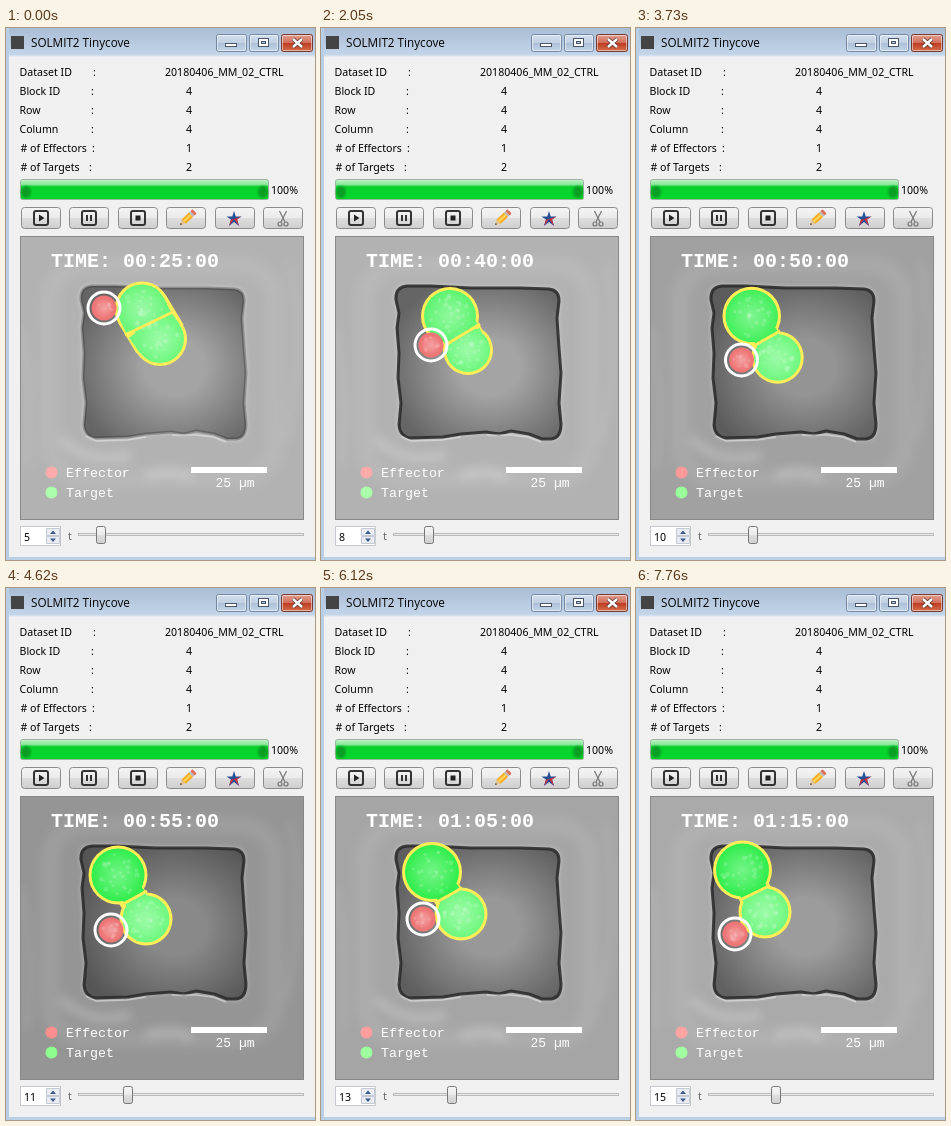
These frames come from a looping animation (309x532 px, 8 s). An HTML page:

```html
<!DOCTYPE html>
<html lang="en">
<head>
<meta charset="utf-8">
<title>Cell viewer</title>
<style>
  html, body { margin: 0; width: 100%; height: 100%; overflow: hidden; background: #f0f0f0; }
  svg { display: block; }
  text { white-space: pre; }
  .ui { font: 10.6px "Noto Sans", "Open Sans", sans-serif; fill: #000; }
  .title { font: 11.7px "Open Sans", "Noto Sans", sans-serif; fill: #000; }
  .mono { font: bold 13.3px "Liberation Mono", monospace; fill: #fff; }
  .small { font-weight: normal; fill: #fff; }
  .clock { font-size: 20px; }
</style>
</head>
<body>
<svg id="stage" width="309" height="532" viewBox="0 0 309 532">
  <defs>
    <linearGradient id="bar" x2="0" y2="1">
      <stop offset="0" stop-color="#a9bdd5"/><stop offset="1" stop-color="#c5d6e9"/>
    </linearGradient>
    <linearGradient id="button" x2="0" y2="1">
      <stop offset="0" stop-color="#f4f4f4"/><stop offset=".48" stop-color="#ebebeb"/>
      <stop offset=".52" stop-color="#dddddd"/><stop offset="1" stop-color="#cfcfcf"/>
    </linearGradient>
    <linearGradient id="glass" x2="0" y2="1">
      <stop offset="0" stop-color="#d3dfed"/><stop offset=".5" stop-color="#c0d0e3"/>
      <stop offset=".52" stop-color="#adc0d7"/><stop offset="1" stop-color="#c4d5e8"/>
    </linearGradient>
    <linearGradient id="close" x2="0" y2="1">
      <stop offset="0" stop-color="#e3a193"/><stop offset=".48" stop-color="#d2705a"/>
      <stop offset=".52" stop-color="#bd3b22"/><stop offset="1" stop-color="#d5724c"/>
    </linearGradient>
    <linearGradient id="progress" x2="0" y2="1">
      <stop offset="0" stop-color="#c4f2cb"/><stop offset=".26" stop-color="#84e794"/>
      <stop offset=".36" stop-color="#0bd02c"/><stop offset=".8" stop-color="#05d62b"/>
      <stop offset="1" stop-color="#05d62b"/>
    </linearGradient>
    <radialGradient id="floor" cx=".57" cy=".53" r=".7">
      <stop id="floorMid" offset=".26"/><stop id="floorEdge" offset=".9"/>
    </radialGradient>
    <radialGradient id="sheen">
      <stop offset="0" stop-color="#fff" stop-opacity=".32"/>
      <stop offset=".6" stop-color="#fff" stop-opacity=".14"/>
      <stop offset="1" stop-color="#fff" stop-opacity="0"/>
    </radialGradient>
    <filter id="soft" x="-20%" y="-20%" width="140%" height="140%"><feGaussianBlur stdDeviation="5"/></filter>
    <filter id="fine"><feGaussianBlur stdDeviation="1"/></filter>
    <filter id="edge"><feGaussianBlur stdDeviation=".5"/></filter>
    <clipPath id="frame"><rect x="15" y="209" width="282" height="282"/></clipPath>
    <path id="well" d="M86 258L110 258 150 260 200 260 228 261Q238 262 238 273L236 290 238 320 240 345 238 375 240 396Q240 410 230 411L221 411 208 406 190 403 178 406 165 404 140 406 122 409 90 410Q79 409 78 397L80 375 77 350 78 325 76 300 78 285 75 272Q74 259 86 258Z"/>
  </defs>

  <rect width="309" height="532" fill="#f0f0f0"/>
  <rect width="309" height="28" fill="url(#bar)"/>
  <path d="M0 0H3V532H0ZM0 529H309V532H0Z" fill="#b9cfe6"/>
  <path d="M3 28H309" stroke="#dfe8f2"/>
  <rect x="5" y="8" width="13" height="13" fill="#444"/>
  <text class="title" x="25" y="18.5">SOLMIT2 Tinycove</text>
  <g stroke="#7288a3">
    <rect x="210.500" y="6.500" width="30" height="17" rx="2" fill="url(#glass)"/>
    <rect x="243.500" y="6.500" width="29" height="17" rx="2" fill="url(#glass)"/>
    <rect x="275.500" y="6.500" width="31" height="17" rx="2" fill="url(#close)" stroke="#733b32"/>
  </g>
  <g fill="none" stroke="#fff" opacity=".5">
    <rect x="211.500" y="7.500" width="28" height="15" rx="1"/>
    <rect x="244.500" y="7.500" width="27" height="15" rx="1"/>
    <rect x="276.500" y="7.500" width="29" height="15" rx="1"/>
  </g>
  <g fill="none" stroke="#4b5668">
    <rect x="219.500" y="15.500" width="11" height="3" fill="#fff"/>
    <rect x="252.500" y="10.500" width="10" height="8" fill="#fff"/>
    <rect x="255.500" y="13.500" width="4" height="2" fill="#b8c8dc"/>
    <path d="M287 11L296 19M296 11L287 19" stroke="#5b3434" stroke-width="4"/>
    <path d="M287 11L296 19M296 11L287 19" stroke="#fff" stroke-width="2.400"/>
  </g>

  <g id="info"></g>

  <rect x="14.500" y="151.500" width="248" height="20" rx="2" fill="url(#progress)" stroke="#9fb3a2"/>
  <g fill="#078c22" opacity=".75" filter="url(#fine)">
    <ellipse cx="20" cy="164" rx="5" ry="6"/><ellipse cx="257" cy="164" rx="5" ry="6"/>
  </g>
  <text class="ui" x="265" y="166">100%</text>

  <g id="buttons" fill="url(#button)" stroke="#8b8b8b"></g>
  <g fill="none" stroke="#333" stroke-width="2">
    <rect x="28" y="183" width="14" height="14" rx="2"/>
    <rect x="76" y="183" width="14" height="14" rx="2"/>
    <rect x="125" y="183" width="14" height="14" rx="2"/>
    <path d="M81 187V193M85 187V193"/>
  </g>
  <path d="M33 186.500L38.500 190 33 193.500ZM129.500 187.500H134.500V192.500H129.500Z" fill="#222"/>
  <g transform="translate(174 197) rotate(-43)">
    <path d="M0 0L5-3V3Z" fill="#e6c398"/><path d="M0 0L2-1V1Z" fill="#333"/>
    <path d="M5-3H15V3H5Z" fill="#f4ad25"/><path d="M5-1H15V1H5Z" fill="#ffd65c"/>
    <path d="M15-3H17V3H15Z" fill="#bbb"/><rect x="17" y="-3" width="3" height="6" rx="1" fill="#e0705b"/>
  </g>
  <path d="M228 183L229.700 188.500H235.500L231 191.500 233 198 228 194 223 198 225 191.500 220.500 188.500H226.300Z" fill="#244f94"/>
  <path d="M228 191L235.500 188.500 231 191.500 233 198ZM228 191L223 198 225 191.500Z" fill="#cf3040"/>
  <g fill="none" stroke="#777" stroke-width="1.200">
    <path d="M273.500 183L279 194M280.500 183L275 194"/>
    <circle cx="274" cy="196" r="2"/><circle cx="280" cy="196" r="2"/>
  </g>

  <g clip-path="url(#frame)">
    <rect id="ground" x="14" y="208" width="284" height="284"/>
    <g fill="none" stroke="#fff" filter="url(#soft)">
      <rect x="44" y="237" width="225" height="214" rx="35" stroke-width="18" opacity=".08"/>
      <path d="M140 448Q166 438 186 450M55 410Q80 438 125 427" stroke-width="10" opacity=".2"/>
      <path d="M14 300Q28 360 20 440M284 235Q302 320 279 412" stroke-width="6" opacity=".1"/>
    </g>
    <use href="#well" fill="none" stroke="#fff" stroke-width="7" opacity=".12" filter="url(#fine)"/>
    <use href="#well" fill="url(#floor)"/>
    <use id="rim" href="#well" fill="none" stroke="#282828" stroke-width="3" stroke-linejoin="round" filter="url(#edge)"/>
    <path d="M80 408L90 413 121 412 140 409M166 407L190 407 207 409 220 414" fill="none" stroke="#eee" stroke-width="1.600" opacity=".5"/>
    <g id="cells"></g>
    <text id="clock" class="mono clock" x="45" y="239"></text>
    <rect x="185" y="439" width="76" height="6" fill="#fff"/>
    <text class="mono small" x="209.500" y="459" style="font-size:13px">25 µm</text>
    <circle id="pink" cx="45.500" cy="444.500" r="6"/>
    <circle id="mint" cx="45.500" cy="464.500" r="6"/>
    <text class="mono small" x="60" y="449">Effector</text>
    <text class="mono small" x="60" y="469">Target</text>
  </g>
  <rect x="14.500" y="208.500" width="283" height="283" fill="none" stroke="#888"/>

  <rect x="14.500" y="498.500" width="40" height="19" fill="#fff" stroke="#c6c9ce"/>
  <path d="M40.500 500.500H53.500V507.500H40.500ZM40.500 508.500H53.500V515.500H40.500Z" fill="#e9edf3" stroke="#c5cad2"/>
  <path d="M44 506L47 502.500 50 506ZM44 510.500L47 514 50 510.500Z" fill="#3e5a8a"/>
  <text id="count" class="ui" x="18" y="513"></text>
  <text class="ui" x="62" y="512" style="fill:#666">t</text>
  <rect x="72.500" y="505.500" width="225" height="2" fill="#e7eaea" stroke="#bbb"/>
  <rect id="thumb" y="498.500" width="9" height="17" rx="2" fill="url(#button)" stroke="#777"/>
</svg>
<script>
const $ = id => document.getElementById(id);
const LOOP = 8000;
const CHANGES = [0, 560, 1330, 2050, 2950, 3730, 4620, 5340, 6120, 7010, 7760];
const FIRST = 5;

// count: upper x,y,r | lower x,y,r | divider x1,y1,x2,y2 | effector x,y | grey
const POSES = {
  5: [136, 281, 26.5, 154, 311, 26, 119, 307, 167, 284, 98, 280, 178],
  8: [129, 288, 28, 147, 322, 24, 123, 318, 159, 296, 110, 317, 178],
  9: [119.5, 289, 28, 143, 328, 25, 120, 319, 147, 303, 106, 322, 173],
  11: [112, 287, 28.5, 140, 331, 25.5, 117, 316, 141, 303, 105, 342, 149],
  13: [111, 284, 29, 140, 326, 25.5, 116, 314, 141, 300, 102, 331, 165],
  14: [111, 284, 28.5, 133, 327, 25.5, 107, 315, 140, 301, 99, 338, 140],
  15: [106.5, 282, 28.5, 129, 324, 25.5, 104, 312, 133, 298, 99, 346, 170]
};
const KEYS = Object.keys(POSES).map(Number);

function poseAt(count) {
  const next = KEYS.find(k => k >= count);
  const prev = KEYS.filter(k => k <= count).pop();
  const mix = next === prev ? 0 : (count - prev) / (next - prev);
  return POSES[prev].map((v, i) => v + (POSES[next][i] - v) * mix);
}

const grey = v => `rgb(${v},${v},${v})`;
const disc = (x, y, r, paint) => `<circle cx="${x}" cy="${y}" r="${r}" ${paint}/>`;
const line = (a, b, c, d, color, width) =>
  `<path d="M${a} ${b}L${c} ${d}" stroke="${color}" stroke-width="${width}"/>`;

function speckles(x, y, r, count, seed) {
  let out = '';
  const random = () => (seed = seed * 16807 % 2147483647) / 2147483647;
  for (let i = 0; i < count; i++) {
    const angle = random() * 6.283, reach = Math.sqrt(random()) * r * .75;
    out += disc(x + reach * Math.cos(angle), y + reach * Math.sin(angle),
      .8 + random() * 1.8, 'fill="#fff" opacity=".16"');
  }
  return out;
}

function drawCells(pose, count) {
  const [ux, uy, ur, lx, ly, lr, x1, y1, x2, y2, ex, ey] = pose;
  const neck = Math.hypot(x2 - x1, y2 - y1);
  const mx = (x1 + x2) / 2, my = (y1 + y2) / 2;
  const yellow = '#ffee58';
  const blend = Math.min(1, (count - FIRST) / 6) ** 2;
  const upper = `rgb(${108 - 58 * blend},${246 - 8 * blend},${124 - 46 * blend})`;
  const lower = 'rgb(112,248,128)';
  const red = 'rgb(238,118,118)';
  $('cells').innerHTML =
    disc(ux, uy, ur + 1, `fill="${yellow}"`) + disc(lx, ly, lr + 1, `fill="${yellow}"`) +
    line(ux, uy, lx, ly, yellow, neck + 2) +
    disc(ux, uy, ur - 2, `fill="${upper}"`) + disc(lx, ly, lr - 2, `fill="${lower}"`) +
    line(ux, uy, mx, my, upper, neck - 4) + line(mx, my, lx, ly, lower, neck - 4) +
    disc(ux, uy, ur - 3, 'fill="url(#sheen)"') + disc(lx, ly, lr - 3, 'fill="url(#sheen)"') +
    speckles(ux, uy, ur, 26, 71 + count) + speckles(lx, ly, lr, 22, 907 + count) +
    line(x1, y1, x2, y2, yellow, 3) +
    disc(ex, ey, 12.5, `fill="${red}"`) + disc(ex, ey, 10, 'fill="url(#sheen)"') +
    speckles(ex, ey, 11, 7, 333 + count) +
    disc(ex, ey, 16, 'fill="none" stroke="#fff" stroke-width="3"');
}

function show(count) {
  const pose = poseAt(count), tone = pose[12];
  const minutes = count * 5;
  const two = n => String(n).padStart(2, '0');
  $('clock').textContent = `TIME: ${two(Math.floor(minutes / 60))}:${two(minutes % 60)}:00`;
  $('count').textContent = count;
  $('thumb').setAttribute('x', 90.5 + Math.floor((count - FIRST) * 4.5));
  $('ground').setAttribute('fill', grey(tone));
  $('floorMid').setAttribute('stop-color', grey(tone * .92));
  $('floorEdge').setAttribute('stop-color', grey(tone * .57));
  $('rim').setAttribute('opacity', count === FIRST ? .3 : .85);
  $('pink').setAttribute('fill', `rgb(255,${tone - 7},${tone - 7})`);
  $('mint').setAttribute('fill', `rgb(${tone - 7},255,${tone - 7})`);
  drawCells(pose, count);
}

const label = (x, y, text) => `<text class="ui" x="${x}" y="${y}">${text}</text>`;
$('info').innerHTML = [
  ['Dataset ID', 87, '20180406_MM_02_CTRL', 159], ['Block ID', 85, 4, 180], ['Row', 85, 4, 180],
  ['Column', 85, 4, 180], ['# of Effectors', 86, 1, 180], ['# of Targets', 83, 2, 180]
].map(([name, colon, value, x], i) => {
  const y = 48 + i * 19;
  return label(name[0] === '#' ? 14.5 : 13.5, y, name) + label(colon, y, ':') + label(x, y, value);
}).join('');

$('buttons').innerHTML = [0, 1, 2, 3, 4, 5].map(i =>
  `<rect x="${Math.round(15 + i * 48.4) + .5}" y="179.5" width="39" height="21" rx="3"/>`).join('');

let shown = -1;
const start = performance.now();
function tick() {
  const time = (performance.now() - start) % LOOP;
  const step = CHANGES.filter(t => t <= time).length - 1;
  if (step !== shown) show(FIRST + (shown = step));
  requestAnimationFrame(tick);
}
tick();
</script>
</body>
</html>
```
